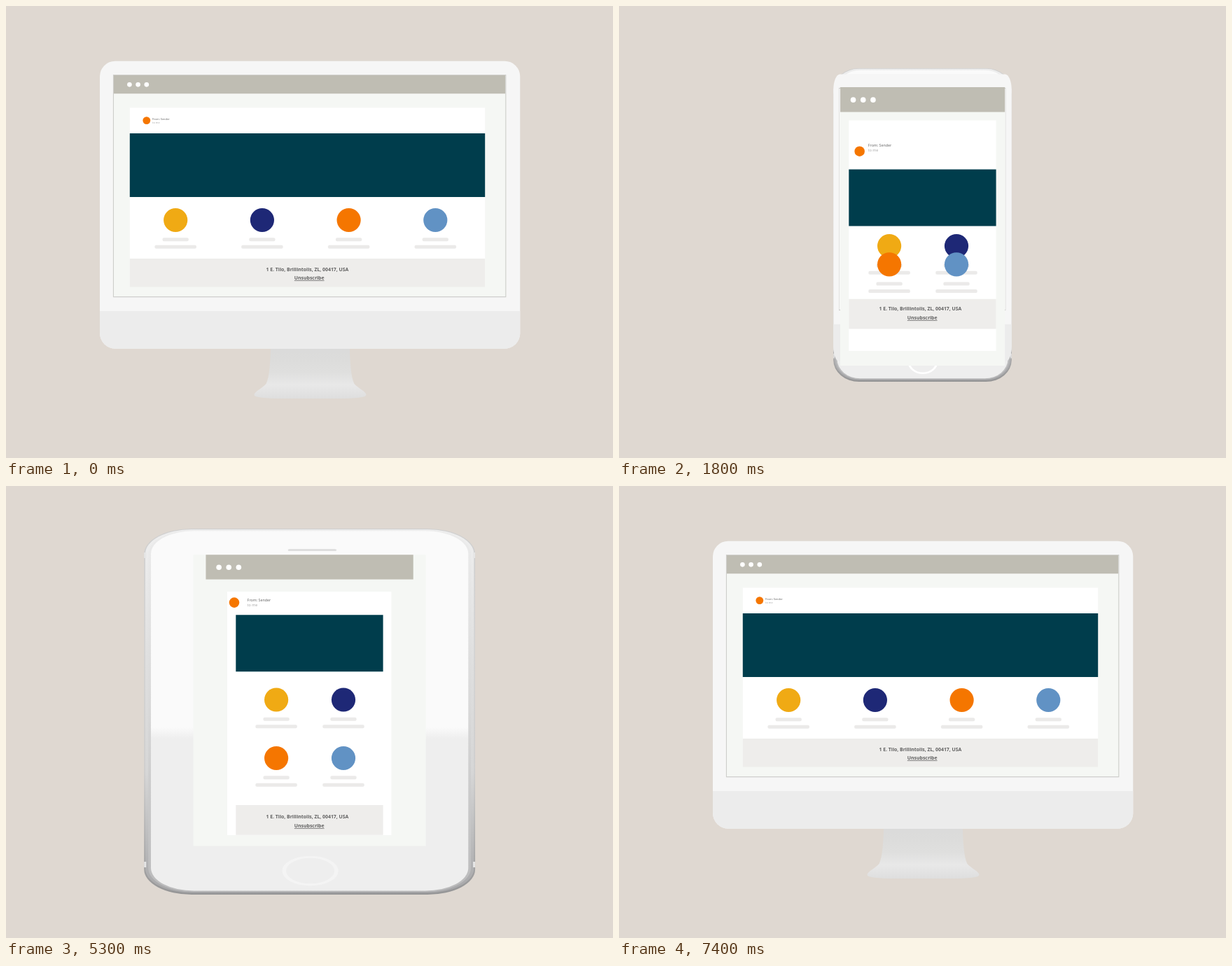
An HTML page with a canvas that plays this animation: 867 by 646 pixels, repeating every 8.1 s.

```html
<!DOCTYPE html>
<html lang="en">
<head>
<meta charset="utf-8">
<title>Responsive email</title>
<style>
  html, body { margin: 0; width: 100%; height: 100%; overflow: hidden; background: #dfd8d1; }
  canvas { display: block; }
</style>
</head>
<body>
<canvas id="stage" width="867" height="646"></canvas>
<script>
const ctx = document.getElementById('stage').getContext('2d');
const LOOP = 8100, STEP = 100;
const FONT = '"Noto Sans", "Open Sans", sans-serif';

const mix = (a, b, p) => a + (b - a) * p;

function ease(t, from, to) {
  const u = Math.min(1, Math.max(0, (t - from) / (to - from)));
  return u * u * (3 - 2 * u);
}

// 0 on the desktop layout, 1 on the phone layout.
const morph = (out0, out1, back0, back1) => t => ease(t, out0, out1) - ease(t, back0, back1);

// Vertical travel: sink while shrinking, settle on the phone, lift while widening, return.
const BEATS = [300, 1200, 1800, 2850, 4400, 5300, 6000, 7100];
function path(desk, sink, phone, lift, nudge = 6) {
  const ys = [desk, desk + 15.5, sink, phone, phone, phone - nudge, lift, desk];
  const slope = i => i < 0 || i > 6 ? 0 : (ys[i + 1] - ys[i]) / (BEATS[i + 1] - BEATS[i]);
  const speed = i => {
    const a = slope(i - 1), b = slope(i);
    return a * b <= 0 ? 0 : 2 * a * b / (a + b);
  };
  return t => {
    if (t <= BEATS[0] || t >= BEATS[7]) return desk;
    const i = BEATS.findIndex(beat => beat > t) - 1;
    const d = BEATS[i + 1] - BEATS[i], u = (t - BEATS[i]) / d, w = 1 - u;
    return mix(ys[i], ys[i + 1], u * u * (3 - 2 * u))
         + d * u * w * (speed(i) * w - speed(i + 1) * u);
  };
}

const body = morph(690, 1870, 4400, 5920);
const screen = morph(690, 1870, 4840, 6090);
const bar = morph(690, 1870, 4978, 6109);
const barGrow = morph(1150, 1800, 5200, 6000);
const mail = morph(200, 1680, 5117, 6160);
const icon = morph(320, 1870, 5060, 6128);
const sender = morph(200, 1680, 5130, 6135);
const senderGrow = morph(1000, 1850, 5300, 6650);
const banner = morph(0, 1410, 5860, 7400);
const bannerShrink = morph(0, 1200, 5250, 7100);
const outer = morph(0, 1425, 5630, 7250);
const inner = morph(0, 1425, 5760, 7250);
const footer = morph(0, 1410, 5490, 6680);
const footerGrow = morph(1200, 1800, 6000, 7100);

const phoneY = path(284, 313, 324.5, 303.5, 2);
const barY = path(98.7, 116, 104.3, 63);
const screenEnd = path(415, 514, 520.5, 462);
const mailY = path(145.5, 163.5, 157, 117);
const mailEnd = path(401, 493, 505, 443);
const iconY = path(163.6, 207.7, 172.6, 133.5);
const senderY = path(161.5, 199.2, 169.5, 127);
const bannerY = path(227.5, 274, 230.8, 201);
const rowOneY = path(306, 343, 310, 302.5, 4.5);
const rowTwoY = path(306, 369.4, 395, 316);
const footerY = path(361, 418.7, 462, 372);
const addressY = path(376.2, 433, 479, 385.8);

function fillBox(x, y, w, h, color, r = 0) {
  ctx.fillStyle = color;
  ctx.beginPath();
  ctx.roundRect(x, y, w, h, r);
  ctx.fill();
}

// Box whose sides travel between desktop and phone positions.
function panel(left, right, p, top, height, color) {
  const x = mix(left[0], left[1], p);
  fillBox(x, top, mix(right[0], right[1], p) - x, height, color);
}

function disc(x, y, r, color) {
  ctx.fillStyle = color;
  ctx.beginPath();
  ctx.arc(x, y, r, 0, 2 * Math.PI);
  ctx.fill();
}

function label(text, x, y, size, weight, color, align = 'left') {
  ctx.font = `${weight} ${size}px ${FONT}`;
  ctx.textAlign = align;
  ctx.fillStyle = color;
  ctx.fillText(text, x, y + size * .36);
}

function fade(y0, y1, ...colors) {
  const g = ctx.createLinearGradient(0, y0, 0, y1);
  colors.forEach((color, i) => g.addColorStop(i / (colors.length - 1), color));
  return g;
}

function drawStand(t) {
  if (t >= 900 && t < 5400) return;
  const y = t < 900 ? -75 * ease(t, 0, 900) : 2 - 2 * ease(t, 6000, 6300);
  ctx.save();
  ctx.translate(434.5, y);
  ctx.fillStyle = fade(485, 561, '#dadada', '#dcdcdb', '#dfdfde', '#e8e8e8', '#dedede');
  ctx.beginPath();
  ctx.moveTo(-56, 480);
  ctx.bezierCurveTo(-57, 510, -58, 530, -63, 540);
  ctx.bezierCurveTo(-68, 546, -80, 551, -80, 556);
  ctx.quadraticCurveTo(-79, 561, -40, 561);
  ctx.lineTo(40, 561);
  ctx.quadraticCurveTo(79, 561, 80, 556);
  ctx.bezierCurveTo(80, 551, 68, 546, 63, 540);
  ctx.bezierCurveTo(58, 530, 57, 510, 56, 480);
  ctx.fill();
  ctx.restore();
}

function drawPhone(t) {
  if (t < 1300 || t > 6900) return;
  const p = body(t), left = mix(134, 308, p), right = mix(733.5, 559, p);
  const height = 523 - 150 * (1 - ease(t, 1200, 2400)) - 112 * ease(t, 5750, 6900);
  ctx.save();
  ctx.translate(left, phoneY(t) - height / 2);
  ctx.scale((right - left) / 251, height / 523);

  // Nested shells from the outline to the bevel, then the front face.
  fillBox(0, 0, 251, 523, fade(0, 523, '#cfcfcf', '#d2d2d2', '#cdcdcd', '#959596'), 36);
  fillBox(.9, 1, 249.2, 519.5, fade(0, 523, '#efefef', '#e0e0e0', '#d6d6d6', '#a6a6a8'), 35);
  for (const x of [0, 249.4]) {
    for (const y of [34, 476]) fillBox(x, y, 1.6, 8, '#e6e6e6');
  }
  fillBox(3.2, 2, 244.6, 517, fade(0, 523, '#ececec', '#d8d8d8', '#bababb'), 34);
  fillBox(5.2, 3.2, 240.6, 514.3, fade(284, 300, '#fafafa', '#eeeeee'), 32.5);

  fillBox(109, 29, 37, 3, '#dedede', 1.5);
  ctx.globalAlpha = 1 - ease(t, 4400, 5900);
  ctx.strokeStyle = '#fff';
  ctx.lineWidth = 3;
  ctx.beginPath();
  ctx.arc(126, 489, 19.8, 0, 2 * Math.PI);
  ctx.stroke();
  ctx.restore();
}

function drawMonitor(t) {
  const p = body(t), left = mix(134, 308, p), right = mix(734.3, 559, p);
  const sink = t < 3000 ? 21 * ease(t, 1000, 2000) : 0;
  ctx.save();
  ctx.globalAlpha = 1 - ease(t, 1800, 2200) + ease(t, 6200, 6800);
  ctx.translate(left, 78.7 + sink);
  ctx.scale((right - left) / 600, 1);
  fillBox(0, 0, 600, 411, '#f6f6f6', 22);
  fillBox(0, 357.3, 600, 53.7, '#ececec', [0, 0, 22, 22]);
  fillBox(19.5, 20, 560, 317, '#f8f8f8');
  ctx.strokeStyle = '#cdcdca';
  ctx.lineWidth = 1.2;
  ctx.strokeRect(19.5, 20, 560, 317);
  ctx.restore();
}

function drawScreen(t) {
  const top = barY(t), k = barGrow(t), h = 26.5 + 9 * k;
  const left = [154, 317.7], right = [713.1, 549.5];
  panel(left, right, screen(t), top, screenEnd(t) - top, '#f5f7f4');
  panel(left, right, bar(t), top, h, '#bfbdb3');
  const x = mix(...left, bar(t)) + 22.4 - 3.9 * k;
  for (let i = 0; i < 3; i++) {
    disc(x + i * (12.2 + 2 * k), top + h / 2 + .4, 3.3 + .5 * k, '#fff');
  }
}

function drawItem(x, y, color) {
  for (const [w, dy] of [[37.4, 25.2], [59.6, 35.7]]) {
    fillBox(x - w / 2, y + dy, w, 5, 'rgba(210,208,206,.45)', 2.2);
  }
  disc(x, y, 17.1, color);
}

function drawMail(t) {
  const left = [176.8, 328.3], right = [684.2, 538.6];
  const top = mailY(t);
  panel(left, right, mail(t), top, mailEnd(t) - top, '#fff');

  const grow = 1 + .35 * senderGrow(t), size = 3.95 * grow;
  const x = mix(209, 355.8, sender(t)), y = senderY(t);
  disc(mix(200.8, 344.5, icon(t)), iconY(t), 5.4 * grow, '#f57600');
  label('From: Sender', x, y, size, 500, '#6b6b6b');
  label('to me', x, y + 5.1 * grow, size, 400, '#ababab');

  const h = 91 - 10 * bannerShrink(t);
  panel(left, right, banner(t), bannerY(t) - h / 2, h, '#003d4c');

  // Four columns fold into two rows of two.
  const rows = [rowOneY(t), rowTwoY(t)];
  ['#f0aa14', '#1e2876', '#f57600', '#6192c4'].forEach((color, i) => {
    const p = i % 3 === 0 ? outer(t) : inner(t);
    drawItem(mix(242.2 + 123.7 * i, 386.1 + 95.9 * (i % 2), p), rows[i >> 1], color);
  });

  panel(left, right, footer(t), footerY(t), 40.5 + 2.3 * footerGrow(t), '#eeedeb');
  const line = addressY(t), ink = '#606060', cx = 433.2;
  label('1 E. Tilo, Brillintolis, ZL, 00417, USA', 430.4, line, 6.9, 600, ink, 'center');
  label('Unsubscribe', cx, line + 12.7, 6.9, 600, ink, 'center');
  const half = ctx.measureText('Unsubscribe').width / 2;
  fillBox(cx - half, line + 16.1, half * 2, .7, ink);
}

function draw(now) {
  const t = Math.floor((now % LOOP) / STEP) * STEP;
  fillBox(0, 0, 867, 646, '#dfd8d1');
  drawStand(t);
  drawPhone(t);
  drawMonitor(t);
  drawScreen(t);
  drawMail(t);
}

let start;
function loop(now) {
  start ??= now;
  draw(now - start);
  requestAnimationFrame(loop);
}
draw(0);
requestAnimationFrame(loop);
</script>
</body>
</html>
```
